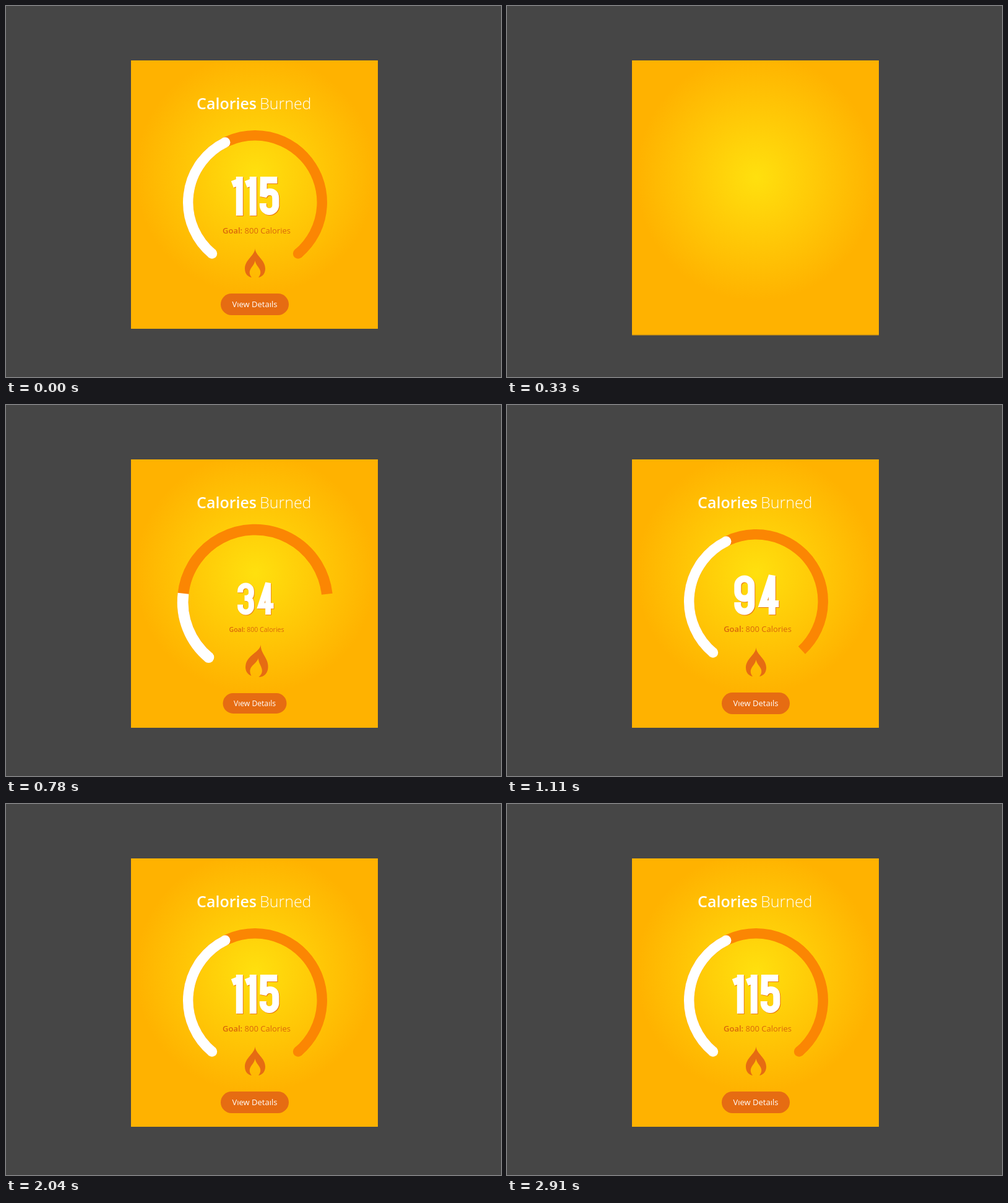
Animation of 800x600 px, one loop 3000 ms. Source, as an HTML page:

```html
<!DOCTYPE html>
<html lang="en">
<head>
<meta charset="utf-8">
<title>Calories Burned</title>
<style>
  html, body { margin: 0; width: 100%; height: 100%; overflow: hidden; background: #464646; }
  #stage { position: relative; width: 800px; height: 600px; overflow: hidden; }
  #card {
    position: absolute; left: 202px; top: 88px; width: 399px; height: 434px;
    background: radial-gradient(circle 195px at 201px 184px, #ffe00e, #ffb200);
    transform-origin: 0 0;
  }
  svg { position: absolute; left: 0; top: 0; font-family: "Open Sans", "Noto Sans", sans-serif; }
  #number { fill: none; stroke: #fff; stroke-width: 11; filter: drop-shadow(1.5px 1.5px 0 #e97a10); }
  .arc { fill: none; stroke-width: 16.5; }
</style>
</head>
<body>
<div id="stage">
  <div id="card"></div>
  <svg width="800" height="600" viewBox="0 0 800 600">
    <g id="title" fill="#fff" font-size="25">
      <text x="405" y="166.5" text-anchor="end" font-weight="600">Calories</text>
      <text x="410" y="166.5" font-weight="300">Burned</text>
    </g>
    <g id="gauge">
      <circle id="startCap" r="8.25" fill="#fff"/>
      <path id="track" class="arc" stroke="#fb8603"/>
      <circle id="trackCap" r="8.25" fill="#fb8603"/>
      <path id="value" class="arc" stroke="#fff"/>
      <circle id="valueCap" r="8.25" fill="#fff"/>
    </g>
    <g id="count"><g id="number" role="img"></g></g>
    <g id="goal" fill="#d9670c" font-size="13">
      <text x="405" y="367.5" text-anchor="middle"><tspan font-weight="600">Goal:</tspan> 800 Calories</text>
    </g>
    <path id="flame" fill="#e66c12" d="M402.5 392C403 404 419 410 419 425C419 433 414 438 408 439
      C411 435 412.5 431 410 426C407.5 421 403.5 418 402.5 412C401.5 418 397.5 421 395 426
      C392.5 431 394 435 397 439C391 438 386 433 386 425C386 410 402 404 402.5 392Z"/>
    <g id="button">
      <rect x="347" y="465" width="110" height="35" rx="17.5" fill="#e66c12"/>
      <text x="402" y="487" text-anchor="middle" font-size="13" fill="#fff">Vıew Detaıls</text>
    </g>
  </svg>
</div>
<script>
const LOOP = 3000, STEP = 30;
const CX = 402.5, CY = 317.5, R = 108.25, START = 130;
const el = id => document.getElementById(id);

// Condensed numerals: [width, centre line], 63 units tall
const DIGITS = [
  [33, "M5.5 16A11 11 0 0 1 27.5 16V47A11 11 0 0 1 5.5 47Z"],
  [17, "M11.5 63V0M0 12.5L9 9"],
  [31, "M5.5 21V16A11 11 0 0 1 27.5 16C27.5 30 8 42 7 57.5H29"],
  [33, "M5.5 19V16A11 11 0 0 1 27.5 16V20Q27.5 30 14 30Q27.5 30 27.5 41V47A11 11 0 0 1 5.5 47V43"],
  [34, "M23 63V0L8 45.5H34"],
  [31, "M28.5 5.5H6.5L6 32C8 27 12 24.5 16 24.5Q26 24.5 26 35V47A10.3 10.5 0 0 1 5.5 47V43"],
  [33, "M27.5 20V16A11 11 0 0 0 5.5 16V47A11 11 0 0 0 27.5 47V38A11 11 0 0 0 5.5 38"],
  [31, "M1 5.5H25C21 24 15 40 13 63"],
  [33, "M6 15A10.5 10.5 0 0 1 27 15V20A10.5 10.5 0 0 1 6 20ZM5.5 42A11 11 0 0 1 27.5 42V47A11 11 0 0 1 5.5 47Z"],
  [33, "M5.5 43V47A11 11 0 0 0 27.5 47V16A11 11 0 0 0 5.5 16V26A11 11 0 0 0 27.5 26"]
];
const GAP = 5;

const outCubic = u => 1 - (1 - u) ** 3;
const inOutCubic = u => u < .5 ? 4 * u ** 3 : 1 - 4 * (1 - u) ** 3;
const outSine = u => Math.sin(u * Math.PI / 2);
const inOutSine = u => (1 - Math.cos(u * Math.PI)) / 2;

const part = (t, from, dur) => Math.min(1, Math.max(0, (t - from) / dur));

function keys(t, list, ease) {
  let [t0, v0] = list[0];
  for (const [t1, v1] of list.slice(1)) {
    if (t < t1) return v0 + (v1 - v0) * ease(part(t, t0, t1 - t0));
    [t0, v0] = [t1, v1];
  }
  return v0;
}

function pose(id, x, y, scale, turn = 0) {
  const node = el(id);
  node.style.display = scale > 0.001 ? "" : "none";
  node.setAttribute("transform",
    `translate(${x} ${y}) rotate(${turn}) scale(${scale}) translate(${-x} ${-y})`);
}

function polar(deg) {
  const a = deg * Math.PI / 180;
  return [CX + R * Math.cos(a), CY + R * Math.sin(a)];
}

function drawArc(id, from, sweep) {
  const d = sweep > 0
    ? `M${polar(from)}A${R} ${R} 0 ${sweep > 180 ? 1 : 0} 1 ${polar(from + sweep)}` : "";
  el(id).setAttribute("d", d);
}

function drawCap(id, deg, on) {
  const [x, y] = polar(deg), node = el(id);
  node.setAttribute("cx", x);
  node.setAttribute("cy", y);
  node.style.display = on ? "" : "none";
}

let shown = -1;
function drawNumber(n) {
  if (n === shown) return;
  shown = n;
  const glyphs = [...String(n)].map(c => DIGITS[c]);
  const width = glyphs.reduce((sum, g) => sum + g[0] + GAP, -GAP);
  let x = 403.3 - width / 2;
  el("number").innerHTML = glyphs.map(([w, d]) => {
    const path = `<path transform="translate(${x} 276)" d="${d}"/>`;
    x += w + GAP;
    return path;
  }).join("");
  el("number").setAttribute("aria-label", n);
}

const cardHeight = t => t < 260
  ? 1.04 * outSine(part(t, 30, 230))
  : keys(t, [[260, 1.04], [420, 1]], inOutSine);

function drawCard(t) {
  const card = el("card");
  // The leading edge smears over half a step while the card unrolls
  const a = cardHeight(t - 7.5), b = cardHeight(t + 7.5);
  const tall = Math.max(a, b), mid = cardHeight(t);
  const moving = t < 420;
  card.style.display = mid > 0 ? "" : "none";
  card.style.transform = moving ? `scaleY(${tall})` : "none";
  card.style.maskImage = card.style.webkitMaskImage = moving
    ? `linear-gradient(#000 ${100 * Math.min(a, b) / tall}%, transparent 100%)` : "none";
}

function draw(time) {
  const t = time < STEP ? LOOP : time;
  drawCard(t);

  pose("title", 401, 157, t < 540
    ? keys(t, [[330, 0], [540, 1.054]], outCubic)
    : keys(t, [[540, 1.054], [690, 1]], inOutSine));

  const track = part(t, 405, 905), value = part(t, 530, 500);
  const full = 280 * outCubic(track), done = 113.5 * inOutCubic(value);
  pose("gauge", 401.5, 305, track > 0 ? 1.1 - .1 * inOutCubic(part(t, 600, 490)) : 0);
  drawArc("track", START, full);
  drawArc("value", START - .4, value > 0 ? done + .4 : 0);
  drawCap("startCap", START, true);
  drawCap("trackCap", START + 280, track >= 1);
  drawCap("valueCap", START + 113.5, value >= 1);

  const grow = outCubic(part(t, 518, 615));
  drawNumber(Math.round(115 * inOutSine(part(t, 445, 922))));
  pose("count", 403.5, 339, grow);
  pose("goal", 405, 363, grow);

  pose("flame", 402.5, 439,
    keys(t, [[570, 0], [750, 1.12], [840, 1.07], [990, 1]], inOutSine),
    keys(t, [[570, -15], [780, 10.5], [870, -6], [960, 3], [1050, 0]], inOutSine));
  pose("button", 402, 482.5, outCubic(part(t, 570, 350)));
}

const origin = performance.now();
function tick() {
  const time = (performance.now() - origin) % LOOP;
  draw(Math.floor(time / STEP) * STEP);
  requestAnimationFrame(tick);
}
draw(0);
requestAnimationFrame(tick);
</script>
</body>
</html>
```
